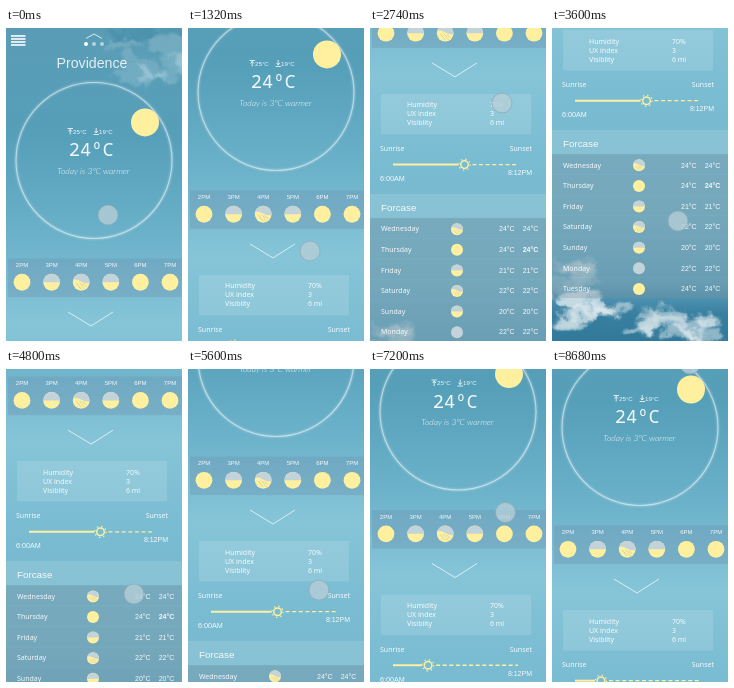
An HTML page for the animation above (8720 ms loop, 176 px wide and 313 px high).

```html
<!DOCTYPE html>
<html lang="en">
<head>
<meta charset="utf-8">
<title>Weather scroll</title>
<style>
html, body { margin: 0; width: 100%; height: 100%; overflow: hidden; background: #69a9c4; }
svg { display: block; width: 100vw; height: 100vh; }
text { fill: #fff; fill-opacity: .92; font-family: "Liberation Sans", Arial, sans-serif; }
.noto { font-family: "Noto Sans", sans-serif; }
.mono { font-family: "Noto Sans Mono", monospace; }
.hand { font-family: Lato, sans-serif; font-style: italic; font-weight: 300; }
.line { fill: none; stroke: #fff; }
</style>
</head>
<body>
<svg id="stage" viewBox="0 0 176 313" preserveAspectRatio="none">
  <defs>
    <linearGradient id="sky" x1="0" y1="0" x2="0" y2="1">
      <stop offset="0" stop-color="#5a9cb5"/>
      <stop offset=".17" stop-color="#569fb9"/>
      <stop offset=".32" stop-color="#69b0c8"/>
      <stop offset=".47" stop-color="#86c5d8"/>
      <stop offset=".6" stop-color="#7abcd2"/>
      <stop offset=".8" stop-color="#74b4ca"/>
      <stop offset=".9" stop-color="#62a5bf"/>
      <stop offset=".95" stop-color="#397fa0"/>
      <stop offset="1" stop-color="#2f7898"/>
    </linearGradient>
    <filter id="fluffy" filterUnits="userSpaceOnUse" x="-20" y="-20" width="216" height="670">
      <feGaussianBlur stdDeviation="1.6" result="puffs"/>
      <feTurbulence type="fractalNoise" baseFrequency=".06" numOctaves="4" seed="4"/>
      <feDisplacementMap in="puffs" scale="22" xChannelSelector="R" yChannelSelector="G"/>
    </filter>
    <filter id="glow" x="-10%" y="-10%" width="120%" height="120%"><feGaussianBlur stdDeviation="1"/></filter>
    <clipPath id="disc"><circle r="1"/></clipPath>
  </defs>
  <g id="page">
    <rect width="176" height="630" fill="url(#sky)"/>
    <g id="clouds" filter="url(#fluffy)"></g>
  </g>
  <circle id="touch" r="10" fill="#b3cdd7" fill-opacity=".82" stroke="#8eabb8" stroke-width=".8"/>
</svg>
<script>
const LOOP = 8720;
const YELLOW = '#fff0a0', GREY = '#c3d3da';
const page = document.getElementById('page');
const touch = document.getElementById('touch');

function add(tag, attrs, parent = page) {
  const node = document.createElementNS('http://www.w3.org/2000/svg', tag);
  for (const key in attrs) node.setAttribute(key, attrs[key]);
  return parent.appendChild(node);
}

// y is the vertical middle of the capitals
function label(value, x, y, size, extra = {}) {
  add('text', { x, y: y + size * 0.36, 'font-size': size, ...extra }).textContent = value;
}

const path = (d, width = 1, extra = {}) =>
  add('path', { d, class: 'line', 'stroke-width': width, ...extra });
const rect = (x, y, width, height, fill, opacity) =>
  add('rect', { x, y, width, height, fill, 'fill-opacity': opacity });

function weatherIcon(kind, x, y, r) {
  const icon = add('g', { transform: `translate(${x} ${y}) scale(${r})` });
  add('circle', { r: 1, fill: kind === 'cloud' ? GREY : YELLOW }, icon);
  if (kind === 'half' || kind === 'rain') {
    const edge = kind === 'half' ? 'M-1 0H1V-1H-1Z' : 'M-1 -.3Q-.5 -.4 0 -.1T1 .1V-1H-1Z';
    add('path', { d: edge, fill: GREY, 'clip-path': 'url(#disc)' }, icon);
  }
  if (kind === 'rain') {
    add('path', {
      d: 'M-.6 .1l.4 .4M-.2 .05l.4 .4M.2 .15l.4 .4M-.3 .5l.3 .3M.1 .5l.3 .3',
      stroke: '#c9cda8', 'stroke-width': .1, fill: 'none'
    }, icon);
  }
}

function buildClouds() {
  const clouds = document.getElementById('clouds');
  let seed = 11;
  const random = () => (seed = seed * 16807 % 2147483647) / 2147483647;
  const bank = (count, x, y, w, h, fill, opacity) => {
    for (let i = 0; i < count; i++) {
      add('ellipse', {
        cx: x + random() * w, cy: y + random() * h,
        rx: 7 + random() * 12, ry: 4 + random() * 6, fill, opacity
      }, clouds);
    }
  };
  bank(7, 110, -2, 70, 18, '#3f87a6', .3);
  bank(14, 115, 14, 70, 40, '#d6e8ee', .2);
  bank(9, 0, 545, 35, 30, '#d6e4e9', .22);
  bank(12, -5, 580, 70, 30, '#edf3f5', .5);
  bank(11, 85, 596, 90, 24, '#edf3f5', .5);
}

function buildHeader() {
  for (let y = 8; y < 18; y += 3) path(`M5 ${y}H19.5`, 1.6);
  path('M80 10.5L88 6L96 10.5', .8);
  [80, 88, 96].forEach((cx, i) =>
    add('circle', { cx, cy: 16, r: 2, fill: '#fff', opacity: i ? .55 : 1 }));
  label('Providence', 86, 35, 14.2, { 'text-anchor': 'middle', opacity: .9 });
}

function buildDial() {
  const ring = { cx: 88, cy: 132.5, r: 78, class: 'line' };
  add('circle', { ...ring, 'stroke-width': 2.2, opacity: .3, filter: 'url(#glow)' });
  add('circle', { ...ring, 'stroke-width': 1.1, opacity: .5 });
  add('circle', { cx: 139, cy: 94.5, r: 14, fill: YELLOW });
  path('M61.5 100.5H67M64.2 106.5V101.5M62.5 103.5L64.2 101.5L66 103.5', .8);
  path('M87.5 106.5H93M90.2 100V105M88.5 103L90.2 105L92 103', .8);
  label('25°C', 67, 103.5, 6.2);
  label('19°C', 93, 103.5, 6.2);
  label('24ºC', 85.2, 121.4, 18.8, { 'text-anchor': 'middle', class: 'mono' });
  label('Today is 3ºC warmer', 87.5, 142.7, 8.6, { 'text-anchor': 'middle', class: 'hand' });
}

function buildHours() {
  rect(2, 230.5, 174, 38.5, '#6c8fae', .34);
  const kinds = ['sun', 'half', 'rain', 'half', 'sun', 'sun'];
  kinds.forEach((kind, i) => {
    const x = 16 + i * 29.6;
    label(`${i + 2}PM`, x, 237, 6, { 'text-anchor': 'middle' });
    weatherIcon(kind, x, 254.3, 8.4);
  });
}

function buildDetails() {
  rect(11, 315, 150, 40.5, '#fff', .13);
  [['Humidity', '70%'], ['UX index', '3'], ['Visiblity', '6 mi']].forEach(([name, value], i) => {
    label(name, 37, 326 + i * 9, 7, { class: 'noto' });
    label(value, 120, 326 + i * 9, 7, { class: 'noto' });
  });
  label('Sunrise', 10, 369.5, 7, { class: 'noto' });
  label('Sunset', 162, 369.5, 7, { class: 'noto', 'text-anchor': 'end' });
  label('6:00AM', 10, 399.5, 7.2);
  label('8:12PM', 162, 393.5, 7, { 'text-anchor': 'end' });
}

function buildForecast() {
  rect(0, 415, 176, 24, '#fff', .13);
  label('Forcase', 11, 428.5, 9.8);
  const days = [
    ['Wednesday', 'rain', 24], ['Thursday', 'sun', 24], ['Friday', 'half', 21],
    ['Saturday', 'rain', 22], ['Sunday', 'half', 20], ['Monday', 'cloud', 22],
    ['Tuesday', 'sun', 24]
  ];
  days.forEach(([day, kind, degrees], i) => {
    const y = 450 + i * 20.6;
    rect(0, y - 10.6, 176, 20.1, '#78909f', .34);
    label(day, 11, y, 7, { class: 'noto' });
    weatherIcon(kind, 87, y + .3, 6);
    label(`${degrees}°C`, 129, y, 7);
    label(`${degrees}°C`, 152.7, y, 7, { 'font-weight': day === 'Thursday' ? 700 : 400 });
  });
}

buildClouds();
buildHeader();
buildDial();
buildHours();
path('M62 284L85 298L107 284', 1, { opacity: .7 });
buildDetails();
const elapsed = path('', 2, { style: `stroke:${YELLOW}` });
const remaining = path('', 1.3, { style: `stroke:${YELLOW}`, 'stroke-dasharray': '4 2.6' });
const marker = add('g', { fill: 'none', stroke: YELLOW });
add('circle', { r: 3.8, 'stroke-width': 1.5 }, marker);
add('circle', { r: 5.6, 'stroke-width': 1.2, 'stroke-dasharray': '1.4 2.998' }, marker);
buildForecast();

// Monotone cubic interpolation through [time, value] points
function curve(points) {
  const slopes = points.slice(1).map((p, i) => (p[1] - points[i][1]) / (p[0] - points[i][0]));
  const tangents = points.map((_, i) => {
    const a = slopes[i - 1], b = slopes[i];
    if (a === undefined || b === undefined) return (a ?? b) * .6;
    return a * b <= 0 ? 0 : 2 * a * b / (a + b);
  });
  return time => {
    let i = 0;
    while (i < points.length - 2 && time >= points[i + 1][0]) i++;
    const [t0, v0] = points[i], [t1, v1] = points[i + 1];
    const span = t1 - t0, u = Math.max(0, Math.min(1, (time - t0) / span));
    const w = u * u * (3 - 2 * u);
    return v0 + (v1 - v0) * w
      + span * u * (1 - u) * (tangents[i] * (1 - u) - tangents[i + 1] * u)
      - span * u * (1 - u) * (1 - 2 * u) * 0;
  };
}

const scrollAt = curve([[0, 0], [1320, 68], [2740, 249], [3500, 313], [3800, 313],
  [4400, 275], [4800, 223], [6200, 108], [8680, 74]]);
const touchX = curve([[0, 102], [1320, 122], [2740, 132], [3600, 126], [4800, 128], [6200, 133], [8680, 138]]);
const touchY = curve([[0, 187], [1320, 223], [2740, 75], [3600, 193], [4800, 225], [6200, 214], [8680, -5]]);

function render(time) {
  const scroll = scrollAt(time);
  const sunX = Math.max(22, Math.min(94.5, 49 + (scroll - 74) * .588));
  page.setAttribute('transform', `translate(0 ${-scroll})`);
  touch.setAttribute('cx', touchX(time));
  touch.setAttribute('cy', touchY(time));
  marker.setAttribute('transform', `translate(${sunX} 385.7)`);
  elapsed.setAttribute('d', `M23 385.7H${Math.max(23, sunX - 6)}`);
  remaining.setAttribute('d', `M${sunX + 8} 385.7H148`);
}

const start = performance.now();
function tick() {
  render((performance.now() - start) % LOOP);
  requestAnimationFrame(tick);
}
tick();
</script>
</body>
</html>
```
